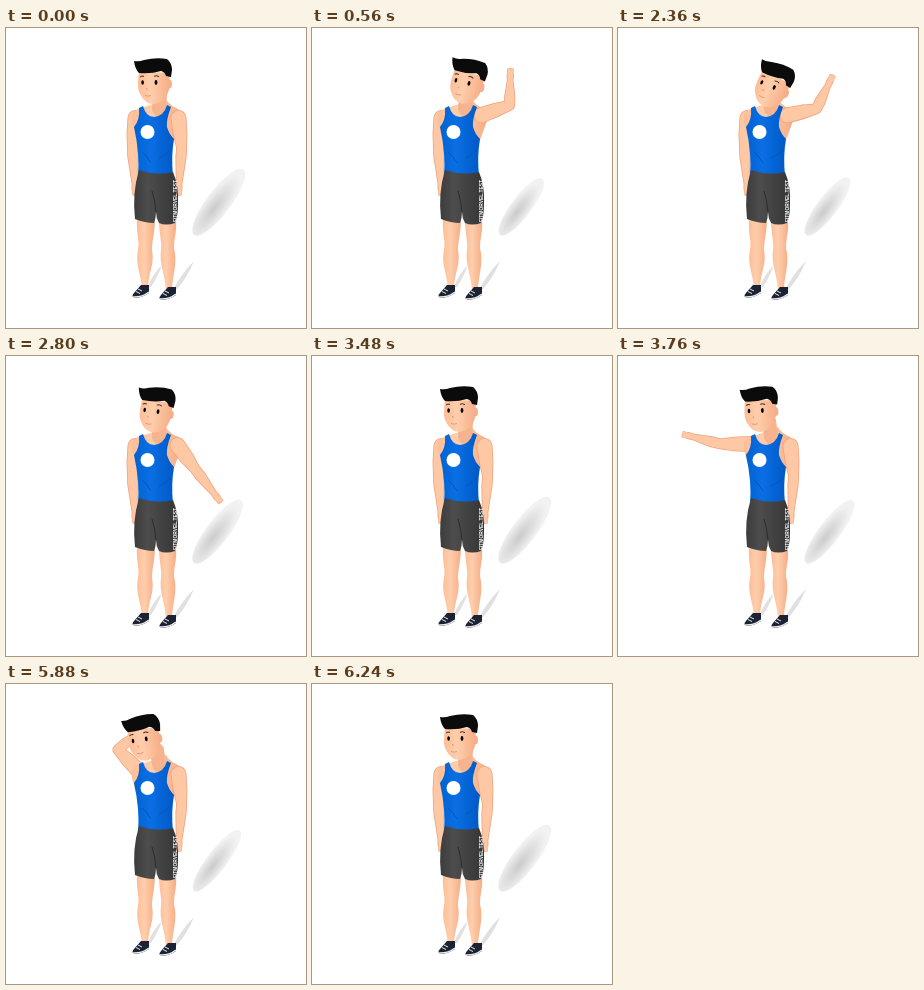
Write an HTML page that moves like this. It is 300 by 300 pixels and loops after 6.84 s.

```html
<!DOCTYPE html>
<html lang="en">
<head>
<meta charset="utf-8">
<title>Neck stretch</title>
<style>
html, body { margin: 0; width: 100%; height: 100%; overflow: hidden; background: #fff; }
svg { display: block; width: 100%; height: 100%; }
.label { font: bold 4.9px "Liberation Sans", sans-serif; fill: #fff; }
.edge { fill: #f0a27c; }
.flesh { fill: #ffc8a4; }
</style>
</head>
<body>
<svg viewBox="0 0 300 300">
  <defs>
    <linearGradient id="skin">
      <stop offset="0" stop-color="#fdbd96"/><stop offset=".4" stop-color="#ffceac"/><stop offset="1" stop-color="#f5ad86"/>
    </linearGradient>
    <linearGradient id="blue">
      <stop offset="0" stop-color="#0062d2"/><stop offset=".4" stop-color="#0a6fe4"/><stop offset="1" stop-color="#0059c6"/>
    </linearGradient>
    <linearGradient id="grey">
      <stop offset="0" stop-color="#3c3c3c"/><stop offset=".3" stop-color="#4d4d4d"/><stop offset="1" stop-color="#353535"/>
    </linearGradient>
    <radialGradient id="shade" cx=".4">
      <stop offset="0" stop-color="#cbcbcb"/><stop offset=".45" stop-color="#dcdcdc"/><stop offset="1" stop-color="#f2f2f2"/>
    </radialGradient>
    <g id="shoe">
      <path d="M143 257V265Q136 270 128 270Q125 268 128 265L135 257Z" fill="#1b2233"/>
      <path d="M143 264Q136 269.500 127 269" fill="none" stroke="#eee" stroke-width="1.500"/>
      <path d="M132 261l4 2M130 263.500l4 2" stroke="#fff" stroke-width=".9"/>
    </g>
  </defs>

  <ellipse id="shadow" fill="url(#shade)" transform="translate(188 207) rotate(-53)"/>
  <path d="M188 233Q175 246 167 262L171 261Q181 250 188 233ZM156 237Q146 247 142 259L145 259Q151 250 156 237Z" fill="#e0e0e0"/>

  <path id="leftEdge" class="edge"/><path id="leftArm" class="flesh"/>

  <g fill="url(#skin)">
    <path d="M131 190C130 208 134 212 132 222C129 236 135 246 136 260H142C142 246 149 236 146 222C146 212 149 205 149 190Z"/>
    <path d="M153 190C153 207 156 212 155 222C153 236 159 246 160 262H166C166 248 172 236 168 220C168 210 171 205 170 190Z"/>
  </g>
  <use href="#shoe"/>
  <use href="#shoe" transform="translate(27 2)"/>

  <path d="M147 76L160 71Q163 77 172 81Q177 85 175 93L168 112H131L126 94Q124 84 132 81Z" fill="url(#skin)"/>
  <line id="neck" x1="153" y1="81" y2="66" stroke="#f6b48e" stroke-width="14" stroke-linecap="round"/>

  <g id="head">
    <ellipse cx="163" cy="56" rx="3" ry="4.500" fill="#f5b08a"/>
    <path d="M133 43C132 54 131 60 134 66Q139 76 148 76Q160 74 163 62L164 45Z" fill="url(#skin)"/>
    <path d="M128 33Q133 34 138 32Q150 29 161 31Q166 35 166 42L165 49L160 48Q159 44 155 43Q145 46 133 45Q129 41 128 33Z" fill="#0b0b0b"/>
    <path d="M134 49q2-1.600 4-.6M148 48.300q2.500-1.400 5 .4" fill="none" stroke="#3a2a22"/>
    <ellipse cx="136.600" cy="54.500" rx="1.300" ry="2.300"/>
    <ellipse cx="150" cy="54.500" rx="1.400" ry="2.400"/>
    <path d="M141 60q-1.500 1.400.5 1.800M139 67.500q3 1.400 6 0" fill="none" stroke="#dd9576" stroke-width=".9"/>
  </g>

  <path id="rightEdge" class="edge"/><path id="rightArm" class="flesh"/>

  <path d="M133 80L137 78Q140 89 148 89Q158 88 161 77L165 79Q160 92 161 99Q163 106 168 111Q165 128 167 148H132Q134 126 128 99Q134 92 133 80Z" fill="url(#blue)"/>
  <path d="M136 124q5 4 9 11M165 122q-6 6-12 8" fill="none" stroke="#0055bd" stroke-width=".9"/>
  <circle cx="141.500" cy="104" r="7" fill="#fff"/>

  <path d="M133 142Q150 148 167 144Q173 158 172 176Q172 188 169 195Q160 198 153 195Q150 190 150 184Q150 190 148 195Q139 195 129 191Q126 165 133 142Z" fill="url(#grey)"/>
  <path d="M150 184Q149 172 146 163" fill="none" stroke="#2c2c2c"/>
  <text class="label" transform="translate(170.500 194) rotate(-90)">FITMORVEL.TEST</text>
</svg>

<script>
const LOOP = 6840, STEP = 40;
const el = id => document.getElementById(id);
const mix = (a, b, k) => a + (b - a) * k;
const ramp = (t, from, to) => Math.min(1, Math.max(0, (t - from) / (to - from)));
const easeOut = k => 1 - (1 - k) ** 2;

// Lift the arm, then push the head, then let both go
function stretch(t, start, release, rest) {
  const held = 1 - ramp(t, release, rest);
  return {
    lift: easeOut(ramp(t, start, start + 680)) * held,
    push: ramp(t, start + 720, start + 1160) * held
  };
}

const polar = ([x, y], deg, r) => {
  const a = deg * Math.PI / 180;
  return [x + r * Math.cos(a), y + r * Math.sin(a)];
};

// Tapered segment with round ends
function taper(a, ra, b, rb) {
  const deg = Math.atan2(b[1] - a[1], b[0] - a[0]) * 180 / Math.PI;
  return `M${polar(a, deg + 90, ra)}A${ra} ${ra} 0 0 1 ${polar(a, deg - 90, ra)}` +
    `L${polar(b, deg - 90, rb)}A${rb} ${rb} 0 0 1 ${polar(b, deg + 90, rb)}Z`;
}

// The arm is posed as a right arm; the left one is its mirror image
function drawArm(name, side, lift, top) {
  const upper = mix(84, top, lift);
  const fore = upper + 10 - 22 * Math.sqrt(lift) - 82 * lift ** 6;
  const length = 48 - 11 * Math.sqrt(lift);
  const shoulder = [mix(21.5, 18, lift), mix(90, 87, lift)];
  const elbow = polar(shoulder, upper, 30);
  const palm = polar(elbow, fore, length - 7);
  const joints = [
    [shoulder, 8], [polar(shoulder, upper, 16), 7.3], [elbow, 5.4],
    [polar(elbow, fore, 9), 5.6], [polar(elbow, fore, length - 12), 3.3], [palm, 3.7]
  ];
  const outline = inset => {
    let d = "";
    for (let i = 1; i < joints.length; i++) {
      const [a, ra] = joints[i - 1], [b, rb] = joints[i];
      d += taper(a, ra - inset, b, rb - inset);
    }
    for (const spread of [-20, 0, 20])
      d += taper(polar(palm, fore + spread * 3, 1.8), 1.7 - inset / 2, polar(palm, fore + spread, 6), 1.3 - inset / 2);
    return d;
  };
  for (const [part, inset] of [["Edge", 0], ["Arm", .8]]) {
    const path = el(name + part);
    path.setAttribute("d", outline(inset));
    path.setAttribute("transform", `translate(151 0) scale(${side} 1)`);
  }
}

function draw(now) {
  const t = Math.floor(now % LOOP / STEP) * STEP;
  const right = stretch(t, 40, 2280, 3000), left = stretch(t, 3480, 5880, 6240);
  const tilt = 14 * right.lift + 11 * right.push - 3 * left.lift - 6 * left.push;
  const dx = -6 * right.push - 7 * left.lift + 2 * left.push;
  const dy = 3 * right.push;

  el("head").setAttribute("transform", `translate(${dx} ${dy}) rotate(${tilt} 150 85)`);
  el("neck").setAttribute("x2", 154 + dx * .6);
  drawArm("right", 1, right.lift, -25);
  drawArm("left", -1, left.lift, -45);

  const half = 41 - 6 * right.lift - 3 * left.lift;
  const shadow = el("shadow");
  shadow.setAttribute("cx", half);
  shadow.setAttribute("rx", half);
  shadow.setAttribute("ry", 12 - 2 * (right.lift + left.lift));
}

const start = performance.now();
function tick() {
  draw(performance.now() - start);
  requestAnimationFrame(tick);
}
tick();
</script>
</body>
</html>
```
